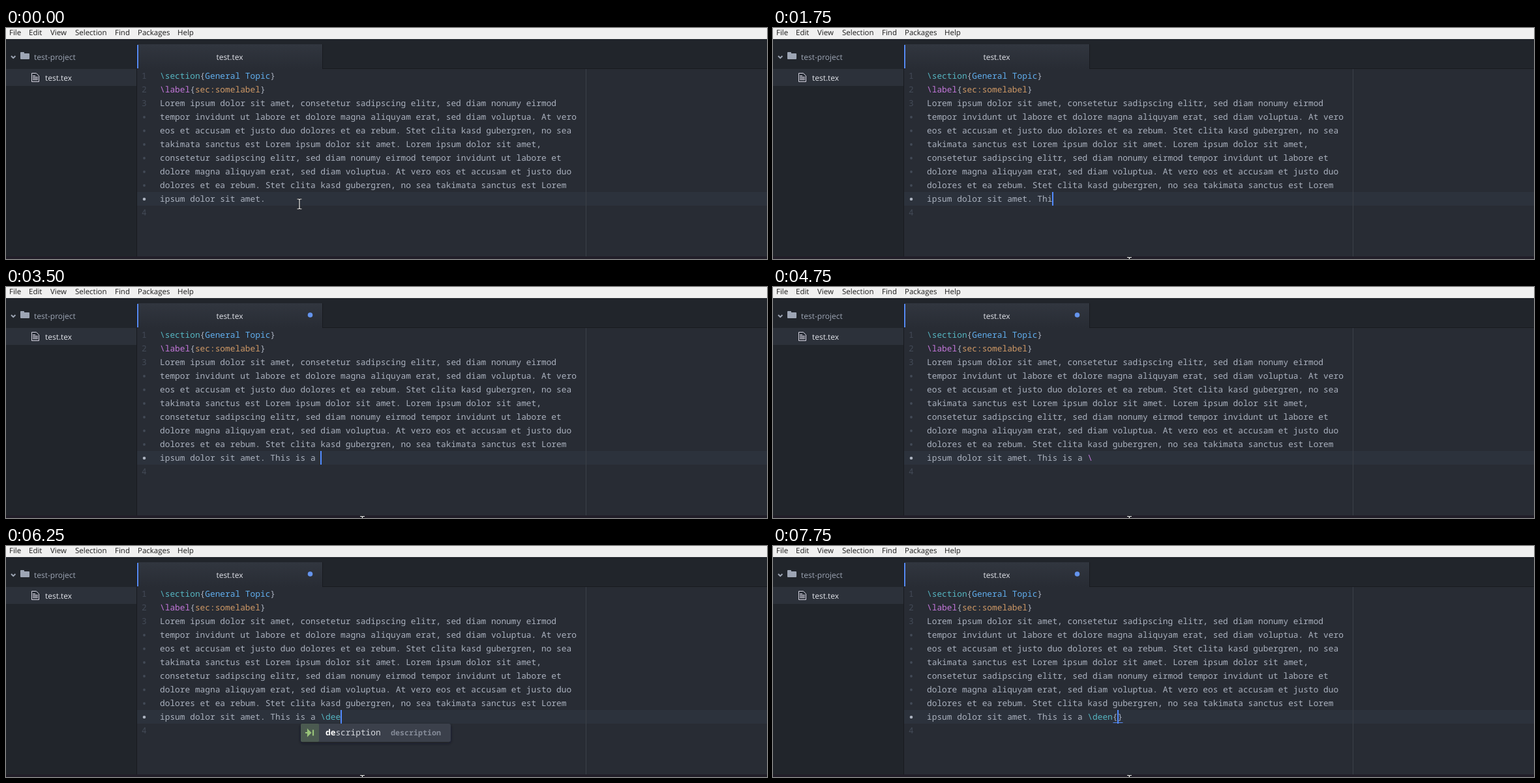
Write an HTML page that moves like this. It is 1167x355 px and loops after 8 s.

```html
<!DOCTYPE html>
<html lang="en">
<head>
<meta charset="utf-8">
<title>Editor</title>
<style>
html, body { margin: 0; width: 100%; height: 100%; overflow: hidden; background: #282c34; }
svg { display: block; width: 1167px; height: 355px; }
text { white-space: pre; text-rendering: geometricPrecision; }
.ui { font-family: "Open Sans", "Noto Sans", sans-serif; }
.code { font: 12.83px "Noto Sans Mono", "DejaVu Sans Mono", monospace; fill: #abb2bf; }
.num { fill: #434a57; }
.cmd { fill: #56b6c2; }
.title { fill: #61afef; }
.key { fill: #c678dd; }
.ref { fill: #d19a66; }
.word { fill: #d7dae0; font-weight: 500; }
.hit { fill: #fff; font-weight: 700; }
.note { font-size: 11.67px; font-weight: 600; fill: #858b98; }
</style>
</head>
<body>
<svg viewBox="0 0 1167 355">
  <defs>
    <linearGradient id="tab" x2="0" y2="1">
      <stop offset="0" stop-color="#31363f"/><stop offset="1" stop-color="#282c34"/>
    </linearGradient>
    <filter id="shade" x="-10%" y="-30%" width="120%" height="180%">
      <feDropShadow dx="0" dy="2" stdDeviation="2.5" flood-color="#14161a" flood-opacity=".6"/>
    </filter>
  </defs>
  <rect width="1167" height="355" fill="#282c34"/>
  <rect y="17" width="1167" height="46" fill="#21252b"/>
  <rect y="17" width="200" height="338" fill="#21252b"/>
  <rect y="63" width="200" height="26" fill="#2c313a"/>
  <rect x="200" y="62" width="967" height="1" fill="#181a1f"/>
  <rect x="200" y="25" width="1" height="330" fill="#181a1f"/>
  <rect x="201" y="25" width="284" height="38" fill="url(#tab)"/>
  <rect x="485" y="25" width="1" height="38" fill="#181a1f"/>
  <rect x="201" y="26" width="2" height="36" fill="#568af2"/>
  <rect width="1167" height="17" fill="#f0f0f0"/>
  <rect x="201" y="252" width="966" height="21" fill="#2c323c"/>
  <rect x="889" y="63" width="1" height="292" fill="#3b4048"/>
  <rect y="351" width="1167" height="4" fill="#211e28"/>

  <g id="menu" class="ui" font-size="11.5" fill="#1c1c1c"></g>

  <path d="M8 43l3.2 3.2 3.2-3.2" fill="none" stroke="#9da5b4" stroke-width="2"/>
  <path d="M22 38q0-1 1-1h4q1 0 1 1v1h7q1 0 1 1v7q0 1-1 1H23q-1 0-1-1z" fill="#9da5b4"/>
  <path d="M39.5 69.5h7l4 4v9h-11z" fill="none" stroke="#d7d5e2"/>
  <path d="M41 73.500h4M41 75.500h8M41 77.500h8M41 79.500h8" stroke="#d7d5e2"/>
  <text class="ui" x="43" y="49" font-size="12" fill="#9da5b4">test-project</text>
  <text class="ui" x="60" y="81" font-size="12" fill="#e2e4ea">test.tex</text>
  <text class="ui" x="343" y="49" font-size="12" fill="#e2e4ea" text-anchor="middle">test.tex</text>
  <circle id="dot" cx="466.500" cy="43" r="3.800" fill="#6494ed"/>

  <g id="lines" class="code"></g>
  <text id="typed" class="code" x="236" y="267"></text>
  <path id="match" d="M521.500 271.500h15" stroke="#568af2"/>
  <rect id="caret" y="252" width="2" height="21" fill="#528bff"/>
  <g id="popup" class="code"></g>
  <g id="mouse" fill="none">
    <path d="M-3.500-7.500h2.500L0-6.500l1-1h2.500M0-6.500v13M-3.500 7.500h2.500L0 6.500l1 1h2.500" stroke="#15171b" stroke-width="2.600"/>
    <path d="M-3.500-7.500h2.500L0-6.500l1-1h2.500M0-6.500v13M-3.500 7.500h2.500L0 6.500l1 1h2.500" stroke="#f4f4f4" stroke-width="1.200"/>
  </g>
</svg>
<script>
const LOOP = 8000, LEFT = 236, CHAR = 7.697, ROW = 21;
const $ = id => document.getElementById(id);
const span = (cls, s) => `<tspan class="${cls}">${s}</tspan>`;
const colX = col => LEFT + col * CHAR;

$("menu").innerHTML = [["File", 5], ["Edit", 35], ["View", 68], ["Selection", 106],
  ["Find", 167], ["Packages", 202], ["Help", 263]]
  .map(([s, x]) => `<text x="${x}" y="11">${s}</text>`).join("");

const lines = [
  span("cmd", "\\section") + "{" + span("title", "General Topic") + "}",
  span("key", "\\label") + "{" + span("ref", "sec:somelabel") + "}",
  "Lorem ipsum dolor sit amet, consetetur sadipscing elitr, sed diam nonumy eirmod",
  "tempor invidunt ut labore et dolore magna aliquyam erat, sed diam voluptua. At vero",
  "eos et accusam et justo duo dolores et ea rebum. Stet clita kasd gubergren, no sea",
  "takimata sanctus est Lorem ipsum dolor sit amet. Lorem ipsum dolor sit amet,",
  "consetetur sadipscing elitr, sed diam nonumy eirmod tempor invidunt ut labore et",
  "dolore magna aliquyam erat, sed diam voluptua. At vero eos et accusam et justo duo",
  "dolores et ea rebum. Stet clita kasd gubergren, no sea takimata sanctus est Lorem",
  "", ""
];
$("lines").innerHTML = lines.map((s, i) => {
  const y = 78 + i * ROW;
  const num = i < 3 ? i + 1 : i === 10 ? 4 : 0;
  const mark = num
    ? `<text class="num" x="208" y="${y}">${num}</text>`
    : `<circle cx="212" cy="${y - 4}" r="${i === 9 ? 2.3 : 1.9}" fill="${i === 9 ? "#abb2bf" : "#434a57"}"/>`;
  return mark + `<text x="${LEFT}" y="${y}">${s}</text>`;
}).join("");

// Suggestion list: column of the word, matched letters, width, entries
const lists = {
  t: { col: 22, hit: 1, width: 204, words: ["table", "tabular"] },
  a: { col: 30, hit: 1, width: 205, words: ["abstract"] },
  de: { col: 33, hit: 2, width: 230, words: ["description"] }
};

function popupMarkup({ col, hit, width, words }) {
  const x = Math.round(colX(col) - 38.5), h = 3 + 25 * words.length;
  const rows = words.map((w, i) => {
    const y = 273 + i * 25, base = y + 18, textX = x + 38;
    const icon = `M${x + 7} ${y + 14}h5M${x + 11} ${y + 10}l4 4-4 4zM${x + 19} ${y + 9.5}v9`;
    return `<rect x="${x}" y="${y}" width="28" height="${h - i * 25}" rx="2" fill="#4b5a50"/>` +
      `<path d="${icon}" stroke="#98c379" stroke-width="2.200" fill="#98c379"/>` +
      `<text x="${textX}" y="${base}">${span("hit", w.slice(0, hit))}${span("word", w.slice(hit))}</text>` +
      `<text class="note" x="${textX + w.length * CHAR + 15.3}" y="${base}">${w}</text>`;
  }).join("");
  return `<rect x="${x}" y="273" width="${width}" height="${h}" rx="3" fill="#3a3f4b" filter="url(#shade)"/>` + rows;
}

// Start time, typed text, caret visible, open list
const steps = [
  [0, "", 0], [250, "", 1], [500, "", 0], [1000, "", 1],
  [1500, "T", 1, "t"], [1750, "Thi", 1], [2000, "This", 1], [2250, "This ", 1],
  [2500, "This is", 1], [2750, "This is ", 1], [3000, "This is a", 1, "a"],
  [3500, "This is a ", 1], [4000, "This is a ", 0], [4250, "This is a \\", 1],
  [4750, "This is a \\", 0], [5250, "This is a \\", 1], [5500, "This is a \\d", 1],
  [5750, "This is a \\de", 1, "de"], [6250, "This is a \\dee", 1, "de"],
  [6500, "This is a \\deen", 1], [7000, "This is a \\deen", 0],
  [7500, "This is a \\deen", 1], [7750, "This is a \\deen{}", 1]
];
const path = [[0, 450, 270.5], [250, 478, 284], [500, 530, 322], [750, 550, 343], [1000, 546.5, 360]];
const at = (list, t) => list.findLast(s => s[0] <= t);
const show = (id, on) => $(id).setAttribute("visibility", on ? "visible" : "hidden");

function colour(s) {
  const cut = s.indexOf("\\");
  if (cut < 0) return s;
  const cmd = s.slice(cut).replace("{}", "");
  return s.slice(0, cut) + span(cmd === "\\" ? "key" : "cmd", cmd) + s.slice(cut + cmd.length);
}

let last;
function draw(t) {
  const step = at(steps, t), [, text, caret, list] = step;
  const [, mx, my] = at(path, t);
  $("mouse").setAttribute("transform", `translate(${mx} ${my})`);
  if (step === last) return;
  last = step;
  const pair = text.endsWith("{}");
  $("typed").innerHTML = "ipsum dolor sit amet. " + colour(text);
  $("caret").setAttribute("x", Math.round(colX(22 + text.length - (pair ? 1 : 0)) - 0.5));
  $("popup").innerHTML = list ? popupMarkup(lists[list]) : "";
  show("caret", caret);
  show("match", pair);
  show("dot", t >= 2750);
}

function tick() {
  draw(performance.now() % LOOP);
  requestAnimationFrame(tick);
}
tick();
</script>
</body>
</html>
```
